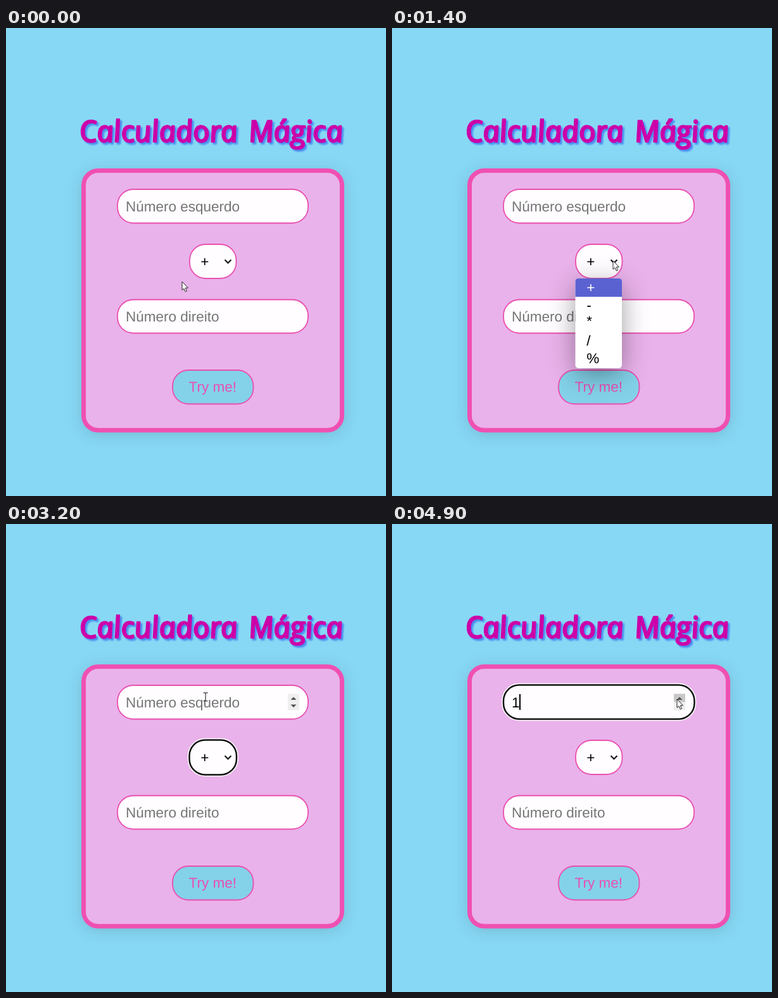
An HTML page that plays this animation: 600 px wide and 740 px high, repeating every 5 s.

```html
<!DOCTYPE html>
<html lang="pt">
<head>
<meta charset="utf-8">
<title>Calculadora Mágica</title>
<style>
html, body { margin: 0; width: 100%; height: 100%; overflow: hidden; background: #87d8f5; }
svg { display: block; font: 22.5px "Liberation Sans", Arial, sans-serif; text-rendering: geometricPrecision; }
.title { font: italic 46px "Open Sans", "Noto Sans", sans-serif; word-spacing: .12em; fill: #cc00a8; stroke: #cc00a8; stroke-width: 2.6; stroke-linejoin: round; }
.glow { filter: drop-shadow(3px 3px 1px #4a8cf0); }
.card { fill: #e9b2ea; stroke: #ef50b2; stroke-width: 7; filter: drop-shadow(0 4px 12px rgba(0, 0, 0, .13)); }
.box { fill: #fffdff; stroke: #ea4fb0; stroke-width: 1.8; }
.hint { fill: #757575; }
.ring rect { fill: none; stroke: #fff; stroke-width: 5.5; }
.ring rect + rect { stroke: #101010; stroke-width: 2.5; }
.menu { filter: drop-shadow(0 10px 20px rgba(0, 0, 0, .38)); }
.chevron { fill: none; stroke: #111; stroke-width: 2; }
.pointer { fill: #fff; stroke: #222; stroke-width: 1; }
.beam { fill: none; stroke: #333; stroke-width: 1.2; }
</style>
</head>
<body>
<svg width="600" height="740" viewBox="0 0 600 740">
  <!-- Leaning back the italic gives upright, handwritten shapes. -->
  <g class="glow">
    <text id="title" class="title" transform="translate(118 180) skewX(9)">Calculadora Mágica</text>
  </g>
  <rect class="card" x="122.5" y="225.5" width="408" height="410.5" rx="23"/>

  <rect class="box" x="176" y="255" width="301" height="53.5" rx="25"/>
  <g id="inputRing" class="ring">
    <rect x="176" y="254.5" width="301.5" height="54" rx="25"/>
    <rect x="176" y="254.5" width="301.5" height="54" rx="25"/>
  </g>
  <text id="hint" class="hint" x="189" y="290">Número esquerdo</text>
  <g id="value">
    <text x="189" y="290">1</text>
    <path d="M202 269V294" stroke="#000" stroke-width="2"/>
  </g>
  <g id="spinner">
    <path d="M445 268.5h18v26h-18z" fill="#efefef"/>
    <path id="hover" d="M445 268.5h18v13h-18z" fill="#c8c8c8"/>
    <path d="M449.5 278l4.5-4.5 4.5 4.5zM449.5 285.5l4.5 4.5 4.5-4.5z" fill="#505050"/>
  </g>

  <rect class="box" x="290" y="342" width="73.5" height="54" rx="25"/>
  <g id="selectRing" class="ring">
    <rect x="289.5" y="341.5" width="74.5" height="55" rx="25"/>
    <rect x="289.5" y="341.5" width="74.5" height="55" rx="25"/>
  </g>
  <text x="307.3" y="377">+</text>
  <path class="chevron" d="M345.5 366.5l5 5 5-5"/>

  <rect class="box" x="176" y="429.5" width="301" height="53" rx="25"/>
  <text class="hint" x="189" y="464">Número direito</text>

  <rect class="box" x="263" y="541" width="127.5" height="53.5" rx="25" style="fill:#83d2e9"/>
  <text x="288.5" y="574.5" fill="#e84fb2">Try me!</text>

  <g id="menu">
    <rect class="menu" x="289.5" y="396" width="73.5" height="142" rx="5" fill="#fff"/>
    <path d="M289.5 425v-24q0-5 5-5h63.5q5 0 5 5v24z" fill="#5a62d2"/>
    <text x="307.3" y="418" fill="#fff">+</text>
    <text x="307.3" y="446">-</text>
    <text x="307.3" y="471">*</text>
    <text x="307.3" y="502">/</text>
    <text x="307.3" y="529.5">%</text>
  </g>

  <g id="cursor">
    <path id="arrow" class="pointer" d="M0 0V13.5l3-2.6 2.3 5 2.2-1-2.2-4.9h4.2z"/>
    <path id="beam" class="beam" d="M-3.5-6.5H-1L0-5.5 1-6.5H3.5M0-5.5V5.5M-3.5 6.5H-1L0 5.5 1 6.5H3.5"/>
  </g>
</svg>
<script>
const LOOP = 5000, STEP = 100;
const el = id => document.getElementById(id);
const show = (id, on) => { el(id).style.display = on ? "" : "none"; };

// Choose the type size that fills the width of the card.
const title = el("title");
title.style.fontSize = 46 * 416 / title.getComputedTextLength() + "px";

// time, x, y
const path = [
  [0, 278, 401], [100, 278, 401], [800, 349, 368], [2100, 349, 368],
  [2700, 283, 272], [3000, 283, 272], [3700, 445, 279],
  [4000, 445, 279], [4300, 450, 277], [LOOP, 450, 277]
];

function cursorAt(t) {
  const i = path.findIndex(p => p[0] > t);
  const [t0, x0, y0] = path[i - 1], [t1, x1, y1] = path[i];
  const k = (t - t0) / (t1 - t0), e = k * k * (3 - 2 * k);
  return [x0 + (x1 - x0) * e, y0 + (y1 - y0) * e];
}

function draw(now) {
  const t = Math.floor(now % LOOP / STEP) * STEP;
  const [x, y] = cursorAt(t);
  const inside = x > 176 && x < 477 && y > 254 && y < 309;
  const onSpinner = inside && x >= 445;
  const typed = t >= 4400;

  show("menu", t >= 1300 && t < 1900);
  show("selectRing", t >= 2100 && !typed);
  show("inputRing", typed);
  show("hint", !typed);
  show("value", typed);
  show("spinner", inside);
  show("hover", onSpinner);
  show("beam", inside && !onSpinner);
  show("arrow", !inside || onSpinner);
  el("cursor").setAttribute("transform", `translate(${x} ${y})`);
  requestAnimationFrame(tick);
}

const start = performance.now();
function tick() { draw(performance.now() - start); }
tick();
</script>
</body>
</html>
```
